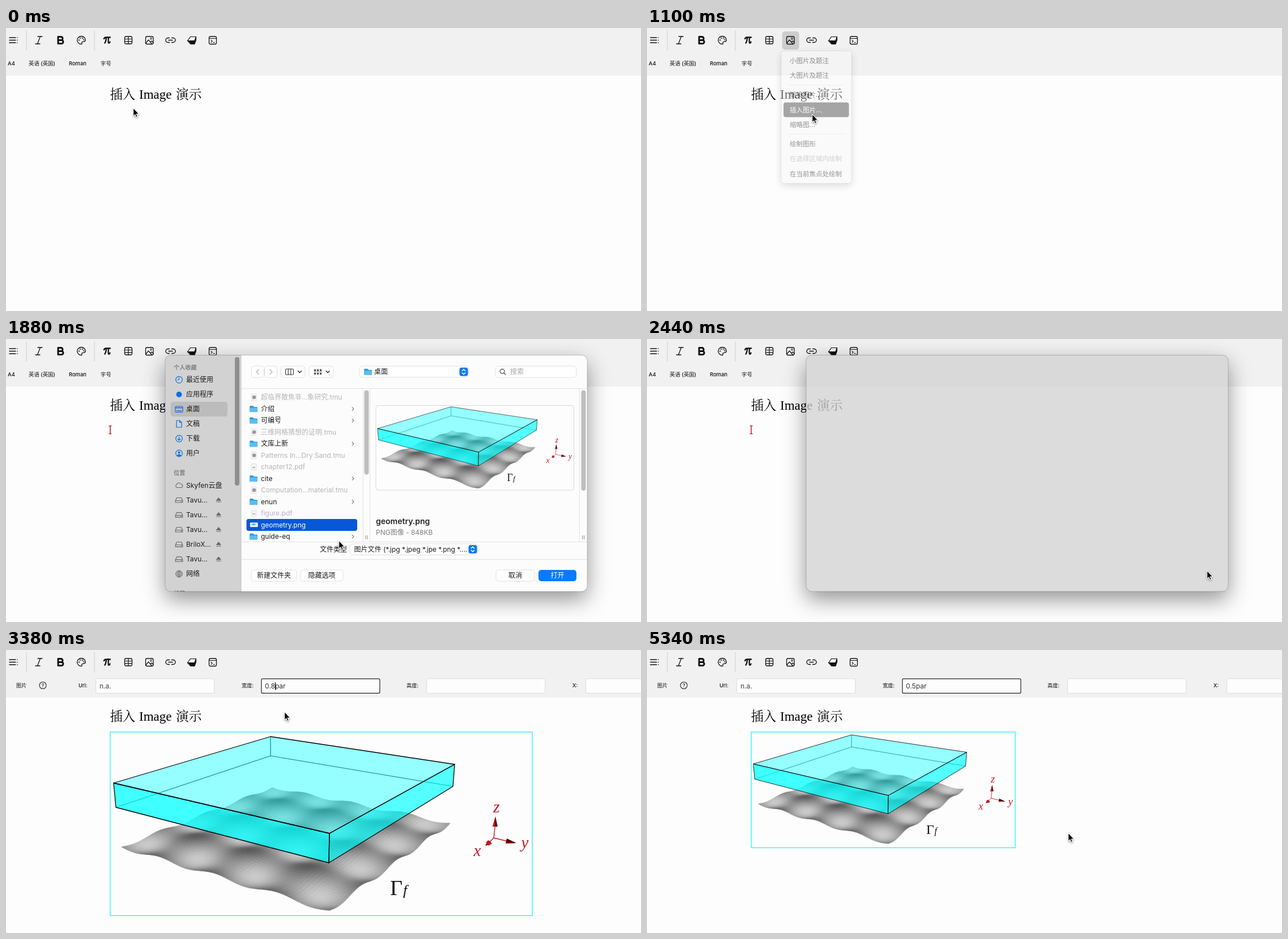
Animation of 1121x500 px, one loop 5.38 s. Source, as an HTML page with a canvas:

```html
<!DOCTYPE html>
<html lang="zh">
<head>
<meta charset="utf-8">
<title>插入 Image 演示</title>
<style>
html, body { margin: 0; width: 100%; height: 100%; overflow: hidden; background: #fdfdfd; }
canvas { display: block; width: 1121px; height: 500px; }
</style>
</head>
<body>
<canvas id="stage" width="1121" height="500"></canvas>
<script>
const LOOP = 5380, WIDTH = 1121, HEIGHT = 500;
const SANS = 'Inter, "Noto Sans CJK SC", "Noto Sans CJK", sans-serif';
const SERIF = '"Liberation Serif", "Noto Serif CJK SC", "Noto Sans CJK SC", serif';
const BLUE = '#0a6fe0', RED = '#cc1526';
const stage = document.getElementById('stage').getContext('2d');
let ctx = stage;

const clamp = v => Math.max(0, Math.min(1, v));
const ramp = (t, a, b) => clamp((t - a) / (b - a));
const smooth = v => v * v * (3 - 2 * v);
const mix = (a, b, k) => a + (b - a) * k;

function newLayer(width, height) {
  const layer = document.createElement('canvas');
  layer.width = width;
  layer.height = height;
  return layer.getContext('2d');
}

// Draws a whole group with one opacity
const group = newLayer(WIDTH, HEIGHT);
function fade(alpha, paint) {
  if (alpha >= 1) return paint();
  group.clearRect(0, 0, WIDTH, HEIGHT);
  ctx = group;
  paint();
  ctx = stage;
  ctx.globalAlpha = alpha;
  ctx.drawImage(group.canvas, 0, 0);
  ctx.globalAlpha = 1;
}

function text(s, x, y, size = 12, color = '#1c1c1c', weight = 400, align = 'left', family = SANS) {
  ctx.font = `${weight} ${size}px ${family}`;
  ctx.fillStyle = color;
  ctx.textAlign = align;
  ctx.fillText(s, x, y + size * 0.36);
}

function box(x, y, w, h, r, fill, stroke, lineWidth = 1) {
  ctx.beginPath();
  ctx.roundRect(x, y, w, h, r);
  if (fill) { ctx.fillStyle = fill; ctx.fill(); }
  if (stroke) { ctx.strokeStyle = stroke; ctx.lineWidth = lineWidth; ctx.stroke(); }
}

function line(x1, y1, x2, y2, color, width = 1) {
  ctx.beginPath();
  ctx.moveTo(x1, y1);
  ctx.lineTo(x2, y2);
  ctx.strokeStyle = color;
  ctx.lineWidth = width;
  ctx.stroke();
}

// SVG path drawn around (x, y)
function icon(x, y, d, stroke, width = 1.3, fill) {
  const path = new Path2D(d);
  ctx.save();
  ctx.translate(x, y);
  ctx.lineJoin = ctx.lineCap = 'round';
  if (fill) { ctx.fillStyle = fill; ctx.fill(path); }
  if (stroke) { ctx.strokeStyle = stroke; ctx.lineWidth = width; ctx.stroke(path); }
  ctx.restore();
}

const circle = (x, y, r, fill, stroke, width) => box(x - r, y - r, 2 * r, 2 * r, r, fill, stroke, width);

function poly(points, fill, stroke, width) {
  ctx.beginPath();
  points.forEach(([x, y]) => ctx.lineTo(x, y));
  ctx.closePath();
  if (fill) { ctx.fillStyle = fill; ctx.fill(); }
  if (stroke) { ctx.strokeStyle = stroke; ctx.lineWidth = width; ctx.stroke(); }
}

/* ---- figure: wavy surface under a translucent slab, 745 x 325 ---- */

function surfacePoint(s, t) {
  const u = s / (s + (1 - s) * 1.25), v = 1.25 * t / (1.25 * t + 1 - t);
  const dip = (Math.sin(7 * Math.PI * s) + Math.sin(7 * Math.PI * t)) * (3 + 1.4 * s - t);
  return [
    mix(mix(20, 387, u), mix(286, 600, u), v),
    mix(mix(203, 315, u), mix(98, 161, u), v) + dip
  ];
}

function drawSurface() {
  const n = 64, d = 1 / n;
  ctx.lineJoin = 'round';
  for (let j = n - 1; j >= 0; j--) {
    for (let i = 0; i < n; i++) {
      const s = i / n, t = j / n;
      const a = 7 * Math.PI * (s + d / 2), b = 7 * Math.PI * (t + d / 2);
      const g = Math.round(146 + 23 * (Math.sin(a) + Math.sin(b)) + 14 * Math.cos(a) - 17 * Math.cos(b));
      const color = `rgb(${g},${g},${g})`;
      poly([surfacePoint(s, t), surfacePoint(s + d, t), surfacePoint(s + d, t + d), surfacePoint(s, t + d)],
        color, color, 1);
    }
  }
}

function drawFigure() {
  const A = [6, 90], B = [283, 8], C = [608, 57], D = [387, 179];
  const a = [10, 133], b = [283, 42], c = [605, 96], d = [386, 231];
  drawSurface();
  for (const [p, q] of [[a, b], [b, c], [B, b]]) line(...p, ...q, '#0b3336', 1.2);
  poly([A, B, C, D], 'rgba(0,255,255,.41)');
  poly([A, D, d, a], 'rgba(0,255,255,.75)');
  poly([D, C, c, d], 'rgba(0,255,255,.67)');
  for (const face of [[A, B, C, D], [A, D, d, a], [D, C, c, d]]) poly(face, null, '#000', 1.3);

  line(677, 187, 680, 160, RED, 1.4);
  line(677, 187, 702, 193, RED, 1.4);
  line(677, 187, 667, 197, RED, 1.4);
  poly([[680, 149], [684, 167], [675, 167]], '#5a0a10');
  poly([[680, 149], [679, 167], [675, 167]], RED);
  poly([[717, 196], [700, 188], [698, 197]], '#4a080c');
  poly([[717, 196], [699, 195], [698, 197]], RED);
  poly([[662, 201], [667, 191], [674, 197]], '#3a0508');
  circle(668, 196, 4.2, RED);
  text('z', 682, 132, 29, RED, 'italic', 'center', SERIF);
  text('x', 648, 209, 29, RED, 'italic', 'center', SERIF);
  text('y', 732, 195, 29, RED, 'italic', 'center', SERIF);
  text('Γ', 494, 274, 38, '#111', '', 'left', SERIF);
  text('f', 517, 279, 26, '#111', 'italic', 'left', SERIF);
}

const figures = {};
function figure(x, y, width) {
  if (!figures[width]) {
    const scale = width / 745, target = ctx;
    ctx = newLayer(width, Math.ceil(325 * scale));
    ctx.scale(scale, scale);
    drawFigure();
    figures[width] = ctx.canvas;
    ctx = target;
  }
  ctx.drawImage(figures[width], x, y);
}

/* ---- editor window ---- */

function drawToolbar(pressed) {
  ctx.fillStyle = '#fdfdfd';
  ctx.fillRect(0, 0, WIDTH, HEIGHT);
  ctx.fillStyle = '#f1f1f1';
  ctx.fillRect(0, 0, WIDTH, 84);
  ctx.setLineDash([1, 2]);
  for (const x of [36, 156]) line(x, 5, x, 39, '#888');
  ctx.setLineDash([]);
  if (pressed) box(238.5, 6, 30, 32, 5, '#cdcdcd');
  const ink = '#111';
  icon(13, 21.5, 'M-7 -4.5H4M-7 0H4M-7 4.5H4M7 -4.5h.1M7 0h.1M7 4.5h.1', ink, 1.5);
  icon(58, 21.5, 'M-2 -6.5H6M-6 6.5H2M2.5 -6.5L-2.5 6.5', ink, 1.3);
  icon(96, 21.5, 'M-4 -6H1A3 3 0 0 1 1 0H-4ZM-4 0H2A3 3 0 0 1 2 6H-4Z', ink, 3);
  icon(133, 21.5, 'M0 7A7.3 7 0 1 1 7.3 0C7.3 4 2 1.5 1 3.5C.5 5 2 7 0 7Z', ink, 1.3);
  for (const [x, y] of [[-4, 0], [-2, -3.7], [2, -3.7], [4.3, -1]]) circle(133 + x, 21.5 + y, 1, null, ink, .8);
  icon(178.5, 21.5, 'M-5.5 -2.5Q-4.5 -5 -2 -5H5.5M-1.6 -4.5Q-1.8 2 -4 5M2.4 -4.5Q1.5 5.5 3.2 5.2Q4.7 5 5 2.8', ink, 2.3);
  box(209.5, 15, 13, 13, 2.5, null, ink, 1.3);
  icon(216, 21.5, 'M-6.5 -2H6.5M-6.5 2.3H6.5M0 -6.5V6.5', ink, 1.2);
  box(246.5, 15, 13.5, 13.5, 2.5, null, ink, 1.3);
  icon(253, 21.5, 'M-6 5L-1.5 -.5L4.5 6.5M2 3.5L4.2 1.5L6.8 4', ink, 1.2);
  circle(256, 18.7, 1.4, null, ink, 1);
  icon(290.5, 21.5, 'M-2 -4H-4.5A4 4 0 0 0 -4.5 4H-2M2 -4H4.5A4 4 0 0 1 4.5 4H2M-3.5 0H3.5', ink, 1.4);
  icon(328, 21.5, 'M-2.5 -6H7.5L5 1H-7.5Z', ink, 1.2);
  icon(328, 21.5, 'M-7.5 1H5L7.5 -6V0L5 7H-2Z', ink, 1, ink);
  box(358.5, 15, 13, 13.5, 2.5, null, ink, 1.3);
  icon(365, 21.5, 'M-6.5 -3H6.5M-3 -.2L-.8 1.8L-3 3.8M1 4H3.2', ink, 1.1);
}

function drawDocumentBar() {
  [['A4', 3], ['英语 (英国)', 40], ['Roman', 111], ['字号', 167]]
    .forEach(([s, x]) => text(s, x, 63, 9.4, '#111', 500));
}

function drawImageBar(width, focused, caret) {
  [['图片', 18], ['Url:', 128], ['宽度:', 416], ['高度:', 707], ['X:', 1000]]
    .forEach(([s, x]) => text(s, x, 63, 9.2, '#111', 500));
  circle(65, 62.5, 6, null, '#222', 1.1);
  text('?', 65, 62.7, 9, '#222', 500, 'center');
  const widthField = 450.9;
  for (const x of [158.7, widthField, 742.7, 1023.7]) {
    const active = focused && x === widthField;
    box(x, 50.8, 209, 25.5, active ? 2 : 1, '#fdfdfd', active ? '#222' : '#dcdcdc', active ? 1.2 : 1);
  }
  text('n.a.', 165, 63.2, 12, '#444');
  text(width, 457, 63.2, 12, '#333');
  if (caret) {
    const end = 457 + ctx.measureText(width.replace('par', '')).width;
    line(Math.round(end) + .5, 57, Math.round(end) + .5, 70, '#111', 1.2);
  }
}

function drawTitle() {
  text('插入', 183.5, 116.5, 22.3, '#000', 300, 'left', SERIF);
  text('Image', 235, 116.5, 23, '#000', 400, 'left', SERIF);
  text('演示', 300, 116.5, 22.7, '#000', 300, 'left', SERIF);
}

function drawCaret(x, top, bottom) {
  line(x, top, x, bottom, RED, 1.5);
  line(x - 2.5, top, x + 2.5, top, RED, 1.3);
  line(x - 2.5, bottom, x + 2.5, bottom, RED, 1.3);
}

function drawMenu(pointerY) {
  const items = [['小图片及题注', 58], ['大图片及题注', 84], ['链接图片...', 118], ['插入图片...', 145],
    ['缩略图...', 171], ['绘制图形', 205], ['在选择区域内绘制', 231], ['在当前焦点处绘制', 257.5]];
  ctx.save();
  ctx.shadowColor = 'rgba(0,0,0,.3)';
  ctx.shadowBlur = 14;
  ctx.shadowOffsetY = 4;
  box(237, 40.5, 124, 234, 5, '#f8f8f8');
  ctx.restore();
  box(237, 40.5, 124, 234, 5, null, 'rgba(0,0,0,.16)', .8);
  line(248, 101, 349, 101, '#dcdcdc');
  line(248, 187.5, 349, 187.5, '#dcdcdc');
  items.forEach(([s, y], i) => {
    const hot = Math.abs(pointerY - y) < 13;
    if (hot) box(241, y - 13.5, 115.5, 26, 4, '#3a3a3a');
    text(s, 252, y, 11.5, hot ? '#fff' : i === 6 ? '#9a9a9a' : '#151515', 500);
  });
}

/* ---- file dialog ---- */

function stepper(x, y) {
  box(x - 7.5, y - 7.5, 15, 15, 4, '#0a78f5');
  icon(x, y, 'M-2.7 -1.8L0 -4.4L2.7 -1.8M-2.7 1.8L0 4.4L2.7 1.8', '#fff', 1.5);
}

function folder(x, y) {
  icon(x, y, 'M-6 -5h5l2 2h5.5v8h-12.5Z', '#259bdb', .8, '#259bdb');
  box(x - 6.5, y - 2, 13.5, 7.3, 1, '#5bbdf3');
}

function drawSidebar() {
  text('个人收藏', 296, 50, 10.2, '#808080', 600);
  box(290.5, 111, 100.5, 26, 5, '#bcbcbc');
  ['最近使用', '应用程序', '桌面', '文稿', '下载', '用户'].forEach((s, i) => text(s, 318, 72 + i * 26, 12));
  circle(305.5, 72, 5.8, null, BLUE, 1.2);
  icon(305.5, 72, 'M0 -3.5V0H-2.7', BLUE, 1.1);
  circle(305.5, 98, 5, BLUE);
  box(299, 119, 13, 10.5, 1.8, null, BLUE, 1.2);
  icon(305.5, 124, 'M-6 -2.5H6M-4 3H4', BLUE, 1.4);
  icon(305.5, 150, 'M-4.5 -6H1L4.5 -2.5V6H-4.5ZM1 -6V-2.5H4.5', BLUE, 1.2);
  circle(305.5, 176, 5.8, null, BLUE, 1.2);
  icon(305.5, 176, 'M0 -3V3M-2.4 .7L0 3L2.4 .7', BLUE, 1.2);
  circle(305.5, 202, 5.8, null, BLUE, 1.2);
  circle(305.5, 200.5, 2.1, BLUE);
  icon(305.5, 202, 'M-3.5 4Q0 -.5 3.5 4Z', BLUE, 1, BLUE);

  text('位置', 296, 236.5, 10.2, '#808080', 600);
  const grey = '#666';
  icon(305.5, 258.5, 'M-4 4A3 3 0 0 1 -4.4 -1.3A4.3 4.3 0 0 1 3.5 -2A3.1 3.1 0 0 1 4.3 4Z', grey, 1.1);
  text('Skyfen云盘', 318, 258.5, 12);
  ['Tavu...', 'Tavu...', 'Tavu...', 'BriloX...', 'Tavu...'].forEach((s, i) => {
    const y = 284.5 + i * 26.1;
    icon(305.5, y, 'M-4 -4H4L6.3 1V4.3H-6.3V1ZM-6.3 1H6.3M3.5 2.7h.8', grey, 1.1);
    text(s, 318, y, 12);
    icon(375.5, y, 'M0 -3.8L3.8 .8H-3.8ZM-3.8 3.3H3.8', grey, 1, grey);
  });
  circle(305.5, 415, 5.8, null, grey, 1);
  icon(305.5, 415, 'M-5.8 0H5.8M0 -5.8V5.8M0 -5.8Q-5.5 0 0 5.8Q5.5 0 0 -5.8M-4.5 -3H4.5M-4.5 3H4.5', grey, .8);
  text('网络', 318, 415, 12);
  text('标签', 296, 449, 10.2, '#808080', 600);
  box(404, 32, 8, 227, 4, '#8e8e8e');
}

function drawFiles(selected) {
  const files = ['-超临界散焦非...象研究.tmu', '介绍', '可编号', '-三维网格猜想的证明.tmu', '文库上新',
    '-Patterns In...Dry Sand.tmu', '-chapter12.pdf', 'cite', '-Computation...material.tmu', 'enun',
    '-figure.pdf', 'geometry.png', 'guide-eq'];
  files.forEach((name, i) => {
    const y = 103 + i * 20.5;
    const faded = name[0] === '-', picture = name.endsWith('png');
    if (picture && selected) box(424.5, y - 10.5, 195.5, 21, 4, '#0757d8');
    if (faded) {
      box(433, y - 6, 9, 12, 1, '#f5f5f5', '#dedede', .8);
      if (name.endsWith('tmu')) circle(438, y, 3.3, '#999');
      else line(435, y + 1, 440, y + 1, '#bbb', 2);
    } else if (picture) {
      box(431, y - 4, 13.5, 7.5, 0, '#f8f8f8', '#ccc', .5);
      poly([[432, y - 1], [437, y - 3], [442, y - 1], [438, y + 1.5]], '#43cfd4');
    } else {
      folder(437, y);
      icon(612.5, y, 'M-1.4 -2.8L1.4 0L-1.4 2.8', '#777', 1.1);
    }
    text(faded ? name.slice(1) : name, 450, y, 12, faded ? '#b5b5b5' : picture && selected ? '#fff' : '#1c1c1c');
  });
}

function button(label, x, w, primary) {
  box(x, 408, w, 20, 5, primary ? '#0a7aff' : '#fff', primary ? null : '#d8d8d8', .8);
  text(label, x + w / 2, 418, 12, primary ? '#fff' : '#1c1c1c', primary ? 500 : 400, 'center');
}

function drawDialogContent(selected) {
  const rule = '#e2e2e2', grip = '#8a8a8a';
  ctx.fillStyle = '#d2d2d2';
  ctx.fillRect(281, 28, 134, 419);
  ctx.fillStyle = '#fcfcfc';
  ctx.fillRect(415, 28, 612, 419);
  line(415, 28, 415, 447, '#c4c4c4');
  drawSidebar();

  for (const [x, w] of [[433.5, 22], [456.5, 22], [485, 43], [535, 43]]) box(x, 48, w, 20, 4.5, '#fff', '#dcdcdc', .9);
  icon(444, 58, 'M2 -4L-2 0L2 4', '#b5b5b5', 1.4);
  icon(468, 58, 'M-2 -4L2 0L-2 4', '#b5b5b5', 1.4);
  box(493.5, 53, 14, 10, 1.5, null, '#333', 1.1);
  icon(500.5, 58, 'M-2.3 -5V5M2.3 -5V5', '#333', 1.1);
  for (let i = 0; i < 6; i++) box(544 + i % 3 * 5, i < 3 ? 53.5 : 59.5, 3.2, 3.2, .6, '#444');
  icon(550.5, 57.8, 'M-6.5 0H6.5', '#777', .7);
  for (const x of [518.5, 568]) icon(x, 58, 'M-3 -1.5L0 1.5L3 -1.5', '#333', 1.5);
  box(624, 48, 193, 19.5, 5, '#fff', '#dcdcdc', .9);
  folder(639, 58);
  text('桌面', 650, 58, 12);
  stepper(808, 58);
  box(864, 48, 143, 20, 5, '#fff', '#dcdcdc', .9);
  circle(876, 57, 3.9, null, '#444', 1.2);
  line(879, 60, 882.3, 63.3, '#444', 1.3);
  text('搜索', 890, 58, 12, '#a8a8a8');
  line(415, 87.5, 1026, 87.5, rule);

  drawFiles(selected);
  for (const x of [630.5, 642.5, 1012.5]) line(x, 88, x, 358, rule);
  box(632.5, 90.5, 8, 149, 4, '#bebebe');
  box(1015.5, 90.5, 8, 177.5, 4, '#bebebe');
  for (const x of [635, 638, 1017.5, 1020.5]) line(x, 347, x, 354, grip);

  if (selected) {
    box(653, 117.5, 349.5, 149.5, 4, '#fdfdfd', '#d8d8d8');
    figure(653, 116, 349);
    text('geometry.png', 653, 322, 14, '#222', 600);
    text('PNG图像 - 848KB', 653, 341.5, 12, '#808080');
  }
  line(415, 358.5, 1026, 358.5, rule);
  text('文件类型', 554, 372, 12);
  box(607, 362, 226, 19.5, 5, '#fff', '#dcdcdc', .9);
  text('图片文件 (*.jpg *.jpeg *.jpe *.png *....', 614.5, 371.5, 12);
  stepper(824, 371.5);
  line(415, 389.5, 1026, 389.5, rule);
  button('新建文件夹', 433, 80);
  button('隐藏选项', 520, 75);
  button('取消', 865, 68);
  button('打开', 940, 67, selected);
}

function drawDialog(content, selected) {
  const frame = () => ctx.roundRect(281, 28.5, 745, 417.5, 10);
  // the shadow stays outside the translucent panel
  ctx.save();
  ctx.beginPath();
  ctx.rect(0, 0, WIDTH, HEIGHT);
  frame();
  ctx.clip('evenodd');
  ctx.beginPath();
  frame();
  ctx.shadowColor = 'rgba(0,0,0,.42)';
  ctx.shadowBlur = 38;
  ctx.shadowOffsetY = 14;
  ctx.fillStyle = '#888';
  ctx.fill();
  ctx.restore();
  ctx.save();
  ctx.beginPath();
  frame();
  ctx.clip();
  if (content) drawDialogContent(selected);
  else {
    ctx.fillStyle = 'rgba(211,211,211,.76)';
    ctx.fillRect(281, 28, 746, 419);
  }
  ctx.restore();
  box(281, 28.5, 745, 417.5, 10, null, 'rgba(0,0,0,.2)', .9);
}

/* ---- pointer ---- */

const POINTER = [[0, 225, 142], [20, 225, 142], [200, 182, 100], [420, 252, 24], [560, 252, 24], [820, 292, 153],
  [1400, 292, 153], [1740, 490, 328], [1790, 490, 328], [1880, 588, 357], [2100, 989, 410], [2440, 989, 410],
  [3100, 478, 62], [3220, 478, 62], [3380, 492, 110], [4640, 492, 110], [5080, 688, 424], [5340, 744, 324]];

function pointerAt(t) {
  const i = POINTER.findIndex(k => k[0] > t);
  if (i < 0) return POINTER[POINTER.length - 1].slice(1);
  const [t0, x0, y0] = POINTER[i - 1], [t1, x1, y1] = POINTER[i];
  const k = smooth(ramp(t, t0, t1));
  return [mix(x0, x1, k), mix(y0, y1, k)];
}

function drawPointer(x, y) {
  ctx.save();
  ctx.shadowColor = 'rgba(0,0,0,.35)';
  ctx.shadowBlur = 3;
  ctx.shadowOffsetY = 1.2;
  icon(x, y, 'M0 0V13.3L2.9 10.6L5 15.6L7.2 14.6L5.1 9.8H9.2Z', '#fff', 1.8, '#fff');
  ctx.restore();
  icon(x, y, 'M0.2 .6V12.7L3 10.1L5.2 15L6.6 14.4L4.5 9.5H8.6Z', null, 0, '#000');
}

function draw(t) {
  const [px, py] = pointerAt(t);
  const inserted = t >= 2560, focused = t >= 3200, resized = t >= 4160;

  drawToolbar(t >= 400 && t < 1200);
  if (t < 2680) drawDocumentBar();
  else {
    const value = t < 3580 ? '0.8par' : t < 3800 ? '0.par' : '0.5par';
    drawImageBar(value, focused, focused && t < 4060 || t >= 4580 && t < 5100);
  }
  drawTitle();

  if (inserted) {
    const width = resized ? 466 : 745;
    figure(184, 145, width);
    box(184, 144.8, width, resized ? 204.5 : 324.5, 0, null, '#20f4f4', 1.3);
    if (!focused) drawCaret(928, 144.5, 470);
  } else if (t >= 1240) drawCaret(184, 153.5, 167.5);

  if (t >= 480 && t < 1150) fade(1 - ramp(t, 1040, 1150), () => drawMenu(py));
  if (t >= 1300 && t < 2560) {
    const alpha = ramp(t, 1300, 1400) * (1 - ramp(t, 2460, 2560));
    fade(alpha, () => drawDialog(t >= 1540 && t < 2300, t >= 1760));
  }
  if (t < 3560 || t >= 4640) drawPointer(px, py);
}

function tick() {
  draw(performance.now() % LOOP);
  requestAnimationFrame(tick);
}
tick();
</script>
</body>
</html>
```
